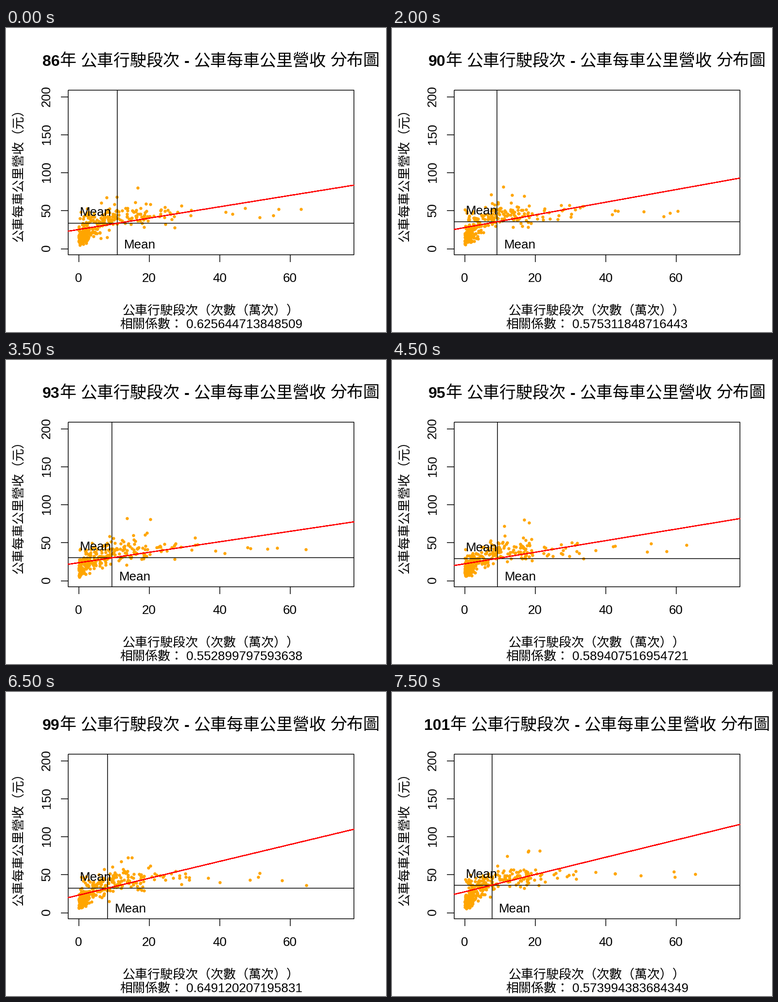
Recreate the animation shown at these times as a matplotlib script. Size 782 by 626 pixels, loop 8 s.

```python
from itertools import groupby

import matplotlib.pyplot as plt
import numpy as np
from matplotlib.animation import ArtistAnimation

W, H, DPI = 782, 626, 100
PX = 72 / DPI                       # points per pixel
LEFT, RIGHT, TOP, BOTTOM = 128, 716, 128, 467
LATIN, CJK = "Liberation Sans", "Noto Sans CJK JP"
EM = 26

# key years: mean x, mean y, trend height at the right edge, correlation
SUMMARY = {
    86: (10.9, 33.5, 83.7, 0.625644713848509),
    88: (9.1, 31.3, 93.9, 0.631283663499646),
    90: (9.15, 35.5, 93.0, 0.575311848716443),
    92: (9.6, 30.7, 75.4, 0.534645937913096),
    95: (9.3, 29.4, 81.8, 0.589407516954721),
    99: (8.2, 32.3, 109.9, 0.649120207195831),
    101: (7.75, 36.4, 116.3, 0.573994383684349),
}

fig = plt.figure(figsize=(W / DPI, H / DPI), dpi=DPI, facecolor="white")
ax = fig.add_axes([0, 0, 1, 1])
ax.set_xlim(0, W)
ax.set_ylim(H, 0)
ax.axis("off")


def sx(v):
    return 149.6 + 7.25 * v


def sy(v):
    return 454.6 - 1.565 * v


def summary(year):
    """Figures for a year, blended between the key years."""
    return [np.interp(year, list(SUMMARY), c) for c in zip(*SUMMARY.values())]


def line(x, y, color="black", smooth=True):
    return ax.plot(x, y, color=color, lw=1.5 * PX, zorder=3, aa=smooth,
                   solid_capstyle="butt")[0]


def label(x, y, s, size=EM, font=LATIN, ha="left", rot=0, weight="normal"):
    return ax.text(x, y, s, family=font, size=size * PX, ha=ha, va="baseline",
                   rotation=rot, rotation_mode="anchor", weight=weight, zorder=4)


def is_cjk(c):
    return ord(c) > 255


def advance(c):
    return {" ": 0.278, ".": 0.278, "-": 0.333}.get(c, 0.556)


def mixed(x, y, s, latin=EM, cjk=EM, weight="normal"):
    """Centred line that mixes Latin and CJK runs."""
    runs = []
    for wide, chars in groupby(s, is_cjk):
        run = "".join(chars)
        width = cjk * len(run) if wide else latin * sum(map(advance, run))
        runs.append((run, wide, width))
    x -= sum(r[2] for r in runs) / 2
    out = []
    for run, wide, width in runs:
        if run.strip():
            pad = latin * 0.278 * (len(run) - len(run.lstrip()))
            style = (cjk, CJK) if wide else (latin, LATIN)
            out.append(label(x + pad, y, run.strip(), *style,
                             weight="normal" if wide else weight))
        x += width
    return out


def cloud(year, mx, my):
    """Dense at the origin, rising to a plateau with a thin tail."""
    rng = np.random.default_rng(year)

    def group(x, base, slope, spread):
        return x, base + slope * x + rng.normal(0, spread, x.size)

    mid_end, far_end = 12 + 0.8 * mx, 20 + 1.5 * mx
    groups = [
        group(np.minimum(rng.exponential(1.5, 120), 6), 14, 2.6, 6),
        group(rng.uniform(0, 3, 8), my + 8, 0, 5),
        group(rng.uniform(1, 10, 85), my - 9, 2, 8),
        group(rng.uniform(10, mid_end, 58), my + 10, 0, 7),
        group(rng.uniform(mid_end, far_end, 19), my + 13, 0, 6),
        group(rng.uniform(6, 23, 4), my + 40, 0, 7),
        group(np.linspace(39, 62, 7) + rng.normal(0, 2, 7), my + 14, 0, 5),
    ]
    x, y = np.hstack(groups)
    return x, np.maximum(y, 4 + 0.8 * np.minimum(x, 15) + rng.uniform(0, 5, x.size))


def scene(year):
    mx, my, end, corr = summary(year)
    x, y = cloud(year, mx, my)
    vx, hy = sx(mx), sy(my)
    slope = (sy(end) - hy) / (RIGHT - vx)
    dots, = ax.plot(sx(x), sy(y), "o", color="#FFA500", ms=6.4 * PX, mew=0,
                    aa=False, zorder=2)
    return [
        dots,
        line([vx, vx], [TOP, BOTTOM]),
        line([LEFT, RIGHT], [hy, hy]),
        line([LEFT, RIGHT], [hy + slope * (LEFT - vx), sy(end)], "red", False),
        label(152, hy - 15, "Mean"),
        label(vx + 14.5, 454.5, "Mean"),
        *mixed(422, 77.5, f"{year}年 公車行駛段次 - 公車每車公里營收 分布圖",
               32, 34, "bold"),
        *mixed(422, 618.5, f"相關係數： {corr:.15f}"),
    ]


# fixed frame, ticks and axis titles
line([LEFT, RIGHT, RIGHT, LEFT, LEFT], [TOP, TOP, BOTTOM, BOTTOM, TOP])
for v in range(0, 61, 20):
    line([sx(v)] * 2, [BOTTOM, BOTTOM + 15])
    label(sx(v), 523, str(v), ha="center")
for v in range(0, 201, 50):
    line([LEFT - 15, LEFT], [sy(v)] * 2)
    label(91, sy(v) - 1.5, str(v), ha="center", rot=90)
mixed(422, 590, "公車行駛段次（次數（萬次））")
label(33, 440, "公車每車公里營收（元）", font=CJK, rot=90)

scenes = [scene(year) for year in range(86, 102)]
anim = ArtistAnimation(fig, scenes, interval=500, repeat=True, repeat_delay=0)
plt.show()
```
